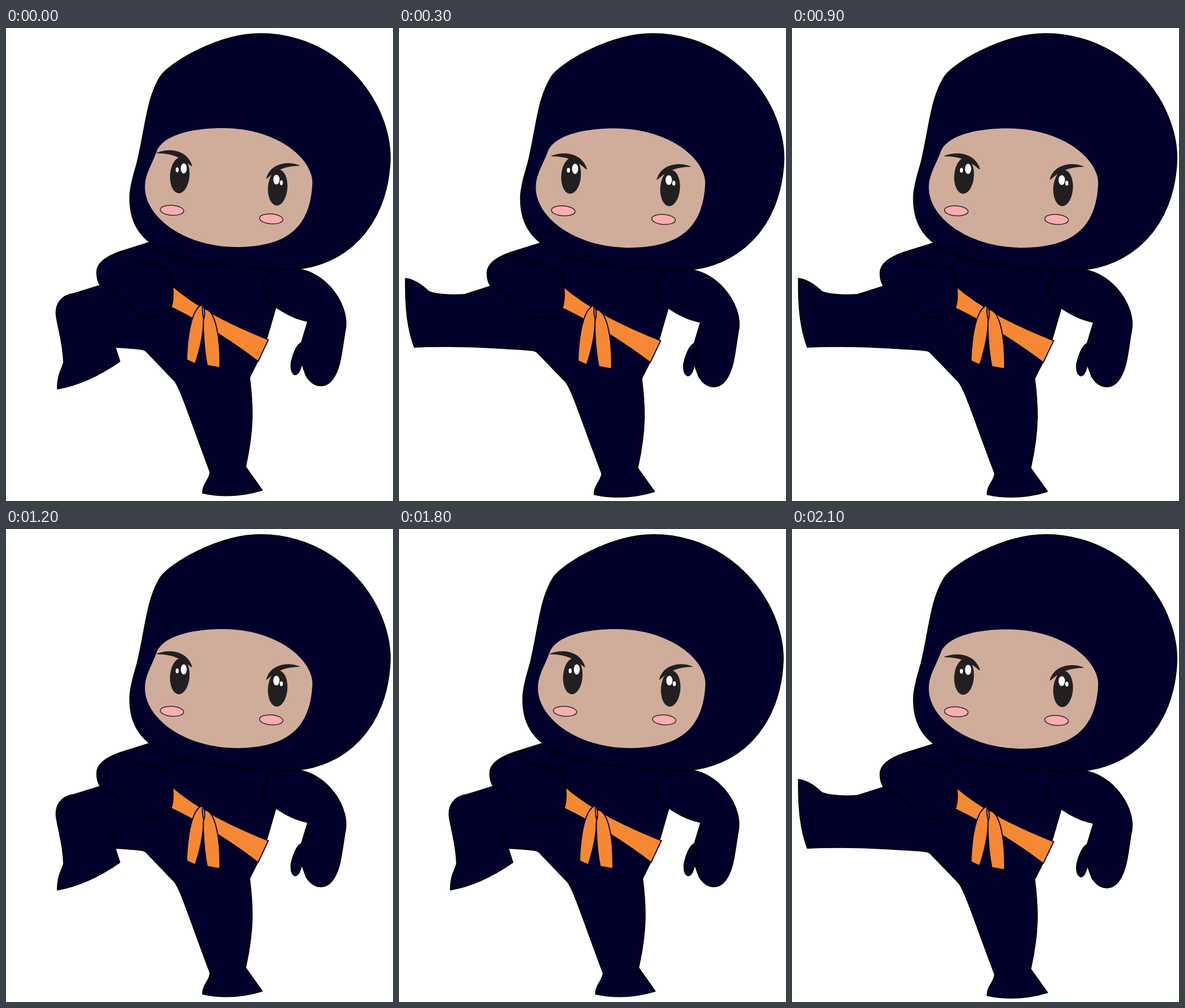
Animation of 677 by 827 pixels, one loop 2400 ms. Source, as an HTML page:

```html
<!DOCTYPE html>
<html>
<head>
<meta charset="utf-8">
<title>Ninja kick</title>
<style>
  html, body { margin: 0; width: 100%; height: 100%; overflow: hidden; background: #fff; }
  svg { display: block; width: 677px; height: 827px; }
  .suit { fill: #00002a; stroke: #000; stroke-width: 2; stroke-linejoin: round; }
  .line { fill: none; stroke: #000; stroke-width: 2; }
  .belt { fill: #f68833; stroke: #00002a; stroke-width: 1.8; }
  .ink { fill: #221f20; }
  .shine { fill: #fff; }
  .blush { fill: #faadb0; stroke: #33262b; stroke-width: 1.5; }
</style>
</head>
<body>
<svg viewBox="0 0 677 827">
  <g id="figure">
    <path id="body" class="suit"/>
    <path id="knee" class="line" d="M180 528L191 558"/>

    <path class="belt" d="M286 447C340 494 400 521 459 545L441 583C410 559 340 511 284 486Z"/>
    <path class="belt" d="M344 484C328 487 318 525 316 580L331 587C343 550 348 520 345 484Z"/>
    <path class="belt" d="M347 491C343 520 347 565 352 590L374 594C375 548 368 492 347 491Z"/>
    <path class="belt" d="M344 484C347 488 349 500 346 509C343 500 343 492 344 484Z"/>

    <path class="suit" d="M474 422L508 421C563 427 603 489 593 530C588 560 586 585 578 602C565 632 540 632 525 608L517 586C515 600 510 607 505 606C499 603 498 595 499 585C502 570 509 553 517 550L528 513C505 508 490 500 472 488C455 475 449 465 450 450C452 435 462 427 474 422Z"/>
    <path class="line" d="M517 550V586"/>

    <path class="suit" d="M200 391C180 398 158 410 159 428C159 440 163 447 165 450C175 453 182 456 187 461L235 503C262 509 285 500 290 485C294 470 292 452 290 447C287 432 283 425 280 420L222 408Z"/>
    <path class="line" d="M280 420L296 399"/>

    <path class="suit" d="M445 10C580 10 672 126 672 228C668 350 590 418 500 422C440 423 340 412 296 398C240 378 214 345 217 290C220 260 230 240 233 220C245 165 248 120 270 85C285 62 370 10 445 10Z"/>
    <path fill="#d0ad9b" d="M380 175C470 175 535 225 536 270C533 350 490 383 402 383C310 382 243 330 243 278C243 255 255 240 265 212C280 185 330 175 380 175Z"/>

    <g class="ink">
      <ellipse rx="17" ry="31.5" transform="translate(304 257.5) rotate(4)"/>
      <ellipse rx="17" ry="31.5" transform="translate(475.3 279) rotate(4)"/>
      <path id="browL" d="M264 218C283 210 317 211 326 242L322 240C312 231 296 219 264 219Z"/>
      <path id="browR" d="M515 241C495 231 461 236 455 264L458 262C467 254 482 241 515 241Z"/>
    </g>
    <g class="shine">
      <ellipse cx="311" cy="245.5" rx="5.3" ry="9"/>
      <ellipse cx="299.5" cy="248" rx="2.7" ry="4.3"/>
      <ellipse cx="473" cy="265" rx="5.5" ry="8.6"/>
      <ellipse cx="481.7" cy="270.5" rx="2.7" ry="4.3"/>
    </g>
    <g class="blush">
      <ellipse rx="20.5" ry="8.7" transform="translate(290.5 318.7) rotate(4)"/>
      <ellipse rx="20.5" ry="8.7" transform="translate(464 333.7) rotate(4)"/>
    </g>
  </g>
</svg>
<script>
const STEP = 300;
const get = id => document.getElementById(id);
const torso = 'C240 561 242 562 245 565L292 614C303 622 318 672 357 776' +
  'C358 788 344 796 344 813C380 821 415 818 448 808L419 767C434 700 432 660 426 611' +
  'L440 583L457 540L472 488L508 421L296 390L254 374L200 391Z';
const bentLeg = 'M165 450L120 464C95 467 86 485 88 503C92 530 100 550 101 585' +
  'C98 597 90 605 90 631C125 625 160 610 199 583L191 558';
const kickLeg = 'M165 450L120 464.6C95 466.6 71 464.6 58 459.6C46 447.7 31 438.7 17.8 436.7' +
  'C17.3 488 21 523 33 556.3C66 554.3 125 555.3 145 556.3';

const poses = [
  { leg: bentLeg, fit: '', left: '', right: '', knee: 'visible' },
  { leg: kickLeg, fit: 'translate(-6.5 0) scale(1.0115 1.003)',
    left: 'translate(6 4.7)', right: 'translate(-3 1)', knee: 'hidden' }
];

let shown = -1;
function draw(now) {
  const index = Math.floor(now / STEP) % 2;
  if (index !== shown) {
    shown = index;
    const pose = poses[index];
    get('body').setAttribute('d', pose.leg + torso);
    get('knee').setAttribute('visibility', pose.knee);
    get('figure').setAttribute('transform', pose.fit);
    get('browL').setAttribute('transform', pose.left);
    get('browR').setAttribute('transform', pose.right);
  }
  requestAnimationFrame(draw);
}
draw(performance.now());
</script>
</body>
</html>
```
